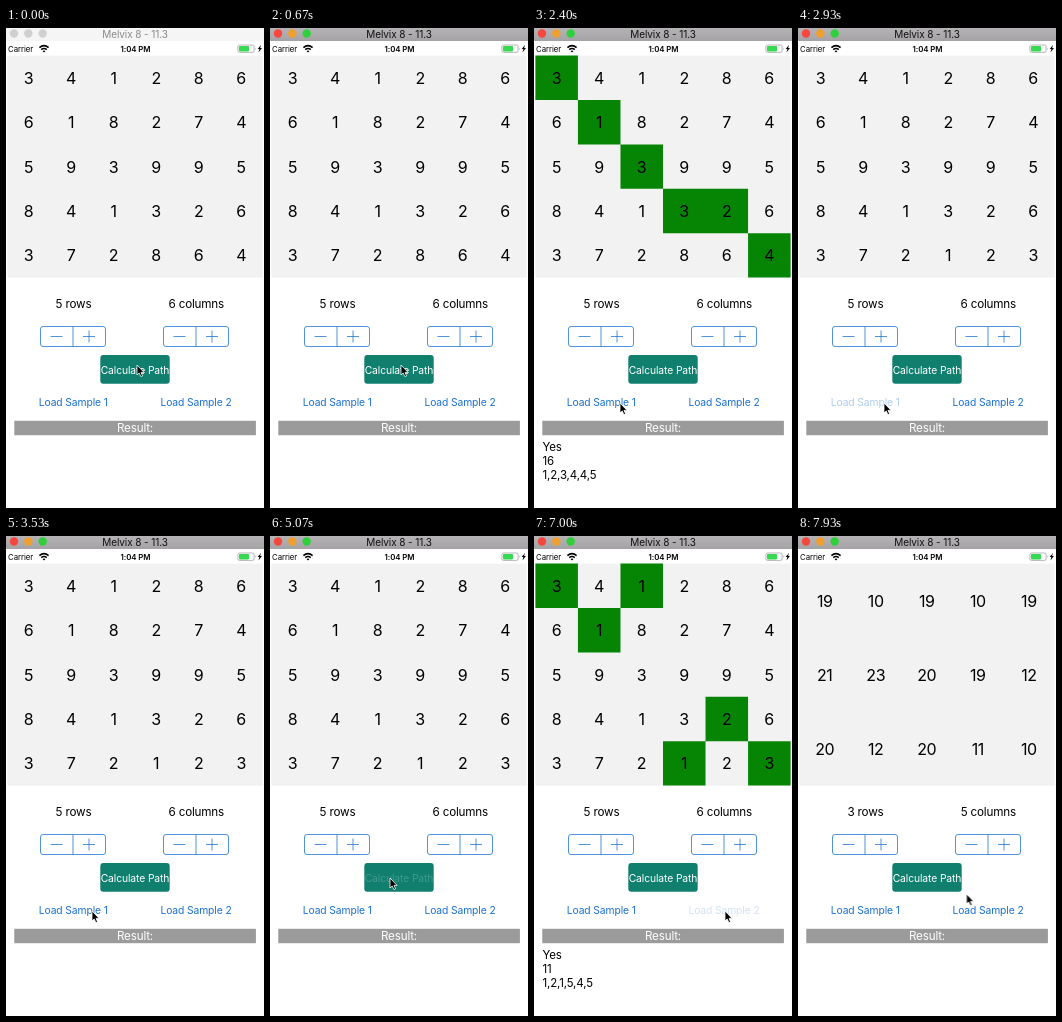
Animation of 258x480 px, one loop 8000 ms. Source, as an HTML page:

```html
<!DOCTYPE html>
<html lang="en">
<head>
<meta charset="utf-8">
<title>Lowest cost path</title>
<style>
html, body { margin: 0; width: 100%; height: 100%; overflow: hidden; background: #fff; }
svg { display: block; width: 100%; height: 100%; }
text { font-family: Inter, "Open Sans", sans-serif; font-size: 11.7px; letter-spacing: -.2px; }
.mid { text-anchor: middle; }
.num { font-size: 16px; letter-spacing: -.4px; text-anchor: middle; }
.out { font-size: 11.5px; letter-spacing: -.15px; }
.btn { font-size: 10.3px; letter-spacing: -.1px; text-anchor: middle; }
.title { font-size: 10px; letter-spacing: -.1px; text-anchor: middle; }
.status { font-size: 7.8px; letter-spacing: -.05px; }
.link { fill: #1a70d2; }

.step { animation: 8s step-end infinite; }
.fade { animation: 8s linear infinite; }

#active { animation-name: active; }
#grid1 { animation-name: grid1; }
#path1 { animation-name: path1; }
#grid2 { animation-name: grid2; }
#path2 { animation-name: path2; }
#grid3 { animation-name: grid3; }
#size1 { animation-name: size1; }
#calc { animation-name: calc; }
#load1 { animation-name: load1; }
#load2 { animation-name: load2; }
#cursor { animation: move 8s ease-in-out infinite; }

@keyframes active { 0% { opacity: 0 } 8.375%, 100% { opacity: 1 } }
@keyframes grid1 { 0% { opacity: 1 } 35.875%, 100% { opacity: 0 } }
@keyframes path1 { 0% { opacity: 0 } 11.625% { opacity: 1 } 35.875%, 100% { opacity: 0 } }
@keyframes grid2 { 0% { opacity: 0 } 35.875% { opacity: 1 } 88.375%, 100% { opacity: 0 } }
@keyframes path2 { 0% { opacity: 0 } 65% { opacity: 1 } 88.375%, 100% { opacity: 0 } }
@keyframes grid3 { 0% { opacity: 0 } 88.375%, 100% { opacity: 1 } }
@keyframes size1 { 0% { opacity: 1 } 88.375%, 100% { opacity: 0 } }

/* pressed labels dim at once and fade back on release */
@keyframes calc {
  0%, 10.87% { opacity: 1 }
  10.875%, 11.625% { opacity: .2; animation-timing-function: ease-out }
  17.5%, 63.37% { opacity: 1 }
  63.375%, 65% { opacity: .2; animation-timing-function: ease-out }
  70.875%, 100% { opacity: 1 }
}
@keyframes load1 {
  0%, 32.495% { opacity: 1 }
  32.5%, 35.875% { opacity: .2; animation-timing-function: ease-out }
  42.5%, 100% { opacity: 1 }
}
@keyframes load2 {
  0%, 84.995% { opacity: 1 }
  85%, 88.375% { opacity: .2; animation-timing-function: ease-out }
  95%, 100% { opacity: 1 }
}
@keyframes move {
  0%, 24.125% { transform: translate(131px, 337px) }
  30%, 45% { transform: translate(86px, 375px) }
  52.5%, 77.5% { transform: translate(120px, 342px) }
  81.625%, 97.5% { transform: translate(191px, 375px) }
  99.1%, 100% { transform: translate(168.5px, 358px) }
}
</style>
</head>
<body>
<svg viewBox="0 0 258 480" preserveAspectRatio="none">
  <defs>
    <linearGradient id="bar" x2="0" y2="1">
      <stop stop-color="#b5b3b5"/><stop offset="1" stop-color="#a4a2a4"/>
    </linearGradient>
    <g id="stepper" fill="none" stroke="#2478d4" stroke-width=".8">
      <rect x=".5" y=".5" width="65" height="20" rx="2.5"/>
      <path d="M33 .5v20M10.5 10.5h12M43 10.5h12M49 4.5v12"/>
    </g>
  </defs>
  <rect width="258" height="480" fill="#fff"/>

  <rect width="258" height="13" fill="#f5f5f5"/>
  <g fill="#d0d0d0">
    <circle cx="8" cy="5.5" r="4.2"/><circle cx="22.3" cy="5.5" r="4.2"/><circle cx="36.7" cy="5.5" r="4.2"/>
  </g>
  <text class="title" x="129" y="9.5" fill="#8a8a8a">Melvix 8 - 11.3</text>
  <g id="active" class="step">
    <rect width="258" height="13" fill="url(#bar)"/>
    <circle cx="8" cy="5.5" r="4.2" fill="#f8473f"/>
    <circle cx="22.3" cy="5.5" r="4.2" fill="#f0a02c"/>
    <circle cx="36.7" cy="5.5" r="4.2" fill="#30cf3c"/>
    <text class="title" x="129" y="9.5" fill="#111">Melvix 8 - 11.3</text>
  </g>

  <text class="status" x="2" y="23.6">Carrier</text>
  <g fill="none" stroke="#000" stroke-width="1.5">
    <path d="M33.4 19.6Q38 15.6 42.6 19.6M35.2 21.6Q38 19.3 40.8 21.6"/>
    <path d="M38 24.6l-1.5-1.6q1.5-1.2 3 0z" fill="#000" stroke="none"/>
  </g>
  <text class="status mid" x="129.5" y="23.8" font-weight="600">1:04 PM</text>
  <rect x="231.9" y="17" width="16.2" height="7.4" rx="1.6" fill="none" stroke="#999" stroke-width=".7"/>
  <rect x="233" y="18" width="10" height="5.4" rx=".8" fill="#38d952"/>
  <path d="M249 19.4q1.2 1.3 0 2.6z" fill="#999"/>
  <path d="M255 17l-3.4 4.1h1.8l-1 3.4 3.6-4.4h-1.9z"/>

  <rect x="1.4" y="27.6" width="255.2" height="222" fill="#f2f2f2"/>
  <g id="path1" class="step"></g>
  <g id="path2" class="step"></g>
  <g id="grid1" class="step"></g>
  <g id="grid2" class="step"></g>
  <g id="grid3" class="step">
    <text class="mid" x="67.5" y="279.5">3 rows</text>
    <text class="mid" x="190.3" y="279.5">5 columns</text>
  </g>
  <g id="size1" class="step">
    <text class="mid" x="67.5" y="279.5">5 rows</text>
    <text class="mid" x="190.3" y="279.5">6 columns</text>
  </g>

  <use href="#stepper" x="34" y="298"/>
  <use href="#stepper" x="157" y="298"/>

  <rect x="94.3" y="327.1" width="69.4" height="28.6" rx="3" fill="#107f6e"/>
  <text id="calc" class="btn fade" x="129" y="345.5" fill="#fff">Calculate Path</text>
  <text id="load1" class="btn link fade" x="67.3" y="378.3">Load Sample 1</text>
  <text id="load2" class="btn link fade" x="190" y="378.3">Load Sample 2</text>

  <rect x="8.3" y="392.8" width="241.6" height="14.4" fill="#9b9b9b"/>
  <text class="mid" x="129" y="404.2" fill="#fff">Result:</text>

  <g id="cursor">
    <path d="M0 0V10L2.2 8 3.9 11.6 5.6 10.8 4 7.4H7.1Z" fill="#000" stroke="#fff" stroke-width=".8"/>
  </g>
</svg>
<script>
const box = { x: 1.4, y: 27.6, w: 255.2, h: 222 };

function add(parent, tag, attrs, text = "") {
  const el = document.createElementNS("http://www.w3.org/2000/svg", tag);
  for (const key in attrs) el.setAttribute(key, attrs[key]);
  el.textContent = text;
  document.getElementById(parent).append(el);
}

function drawGrid(id, rows) {
  const ch = box.h / rows.length;
  rows.forEach((row, r) => {
    const cells = row.split(" ");
    const cw = box.w / cells.length;
    cells.forEach((value, c) => add(id, "text", {
      class: "num", x: box.x + cw * (c + .5) - .2, y: box.y + ch * (r + .5) + 6
    }, value));
  });
}

function drawPath(id, cost, path) {
  const cw = box.w / path.length, ch = box.h / 5;
  const cells = path.map((row, c) =>
    `M${box.x + cw * c} ${box.y + ch * (row - 1)}h${cw}v${ch}h${-cw}z`);
  add(id, "path", { d: cells.join(""), fill: "#068504" });
  ["Yes", cost, path.join(",")].forEach((line, i) =>
    add(id, "text", { class: "out", x: 8.5, y: 423 + 14.1 * i }, line));
}

const top4 = ["3 4 1 2 8 6", "6 1 8 2 7 4", "5 9 3 9 9 5", "8 4 1 3 2 6"];
drawGrid("grid1", [...top4, "3 7 2 8 6 4"]);
drawGrid("grid2", [...top4, "3 7 2 1 2 3"]);
drawGrid("grid3", ["19 10 19 10 19", "21 23 20 19 12", "20 12 20 11 10"]);
drawPath("path1", 16, [1, 2, 3, 4, 4, 5]);
drawPath("path2", 11, [1, 2, 1, 5, 4, 5]);
</script>
</body>
</html>
```
